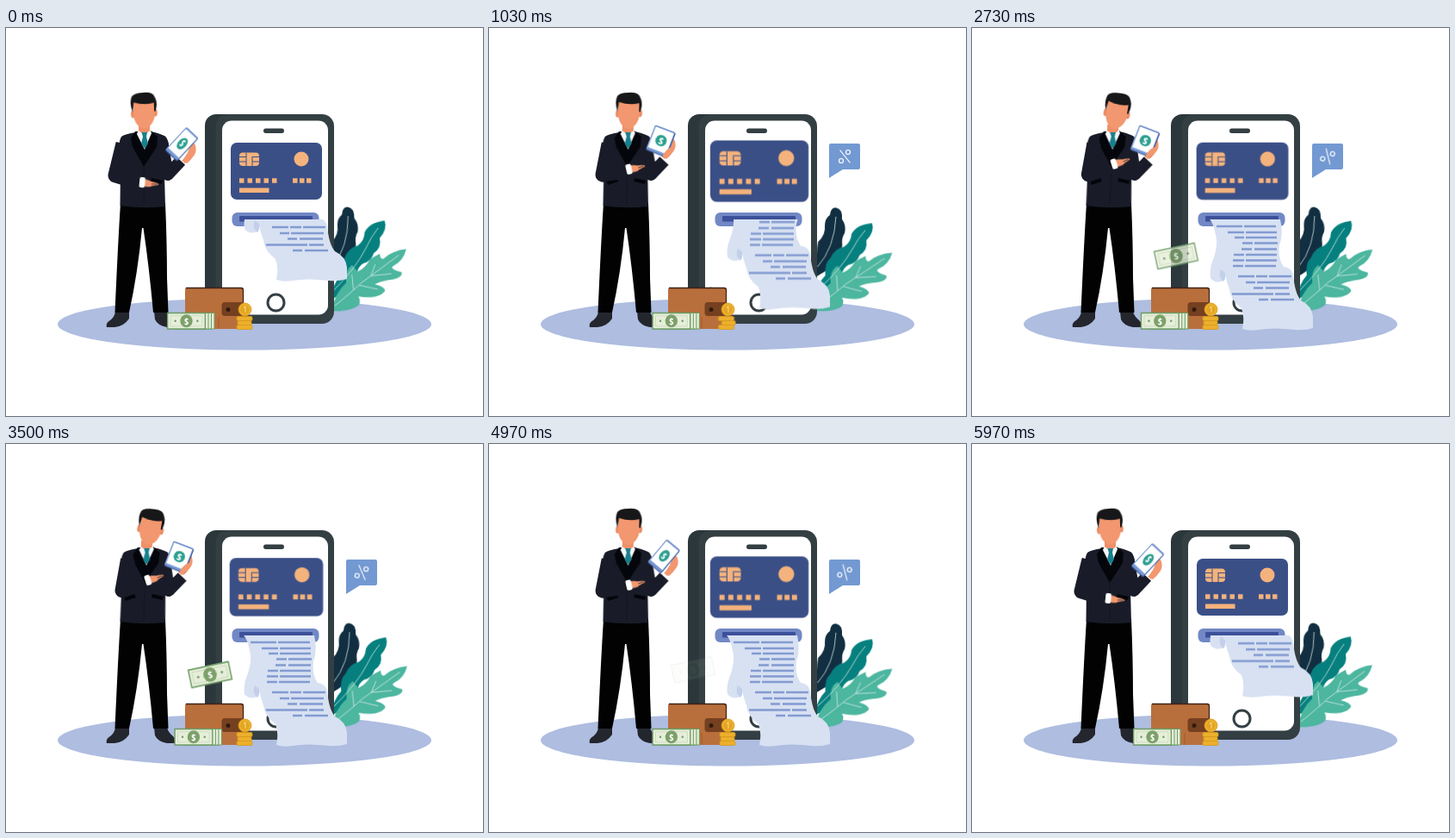
Write an HTML page that moves like this. It is 554 px wide and 450 px high and loops after 6010 ms.

```html
<!DOCTYPE html>
<html lang="en">
<head>
<meta charset="utf-8">
<title>Mobile payment</title>
<style>
:root { --loop: 6.01s; --sine: cubic-bezier(.37, 0, .63, 1); }
html, body { margin: 0; width: 100%; height: 100%; overflow: hidden; background: #fff; }
svg { display: block; }
text { font: 700 10px "Open Sans", Arial, sans-serif; text-anchor: middle; fill: #fff; }

/* fast: two swings per loop, slow: one */
.fast { animation: calc(var(--loop) / 4) var(--sine) infinite alternate; }
.slow { animation: calc(var(--loop) / 2) var(--sine) infinite alternate; }
.once { animation: var(--loop) var(--sine) infinite; }

#leaves { animation-name: sway; transform-origin: 385px 325px; }
@keyframes sway { from { transform: rotate(-3.6deg); } to { transform: rotate(.3deg); } }

#card { animation-name: grow; transform-origin: 314px 166px; }
@keyframes grow { to { transform: scale(1.1); } }

#stack { animation-name: slide; }
@keyframes slide { to { transform: translateX(9px); } }

#torso { animation-name: lean; transform-origin: 160px 206px; }
@keyframes lean { to { transform: skewX(-2deg); } }

#head { animation-name: nod; transform-origin: 161px 122px; }
@keyframes nod {
  from { transform: rotate(-2deg); }
  to { transform: translateX(3px) rotate(10deg); }
}

#receipt { animation-name: print; }
@keyframes print {
  0%, 100% { transform: translateY(-57px); }
  31.5%, 83.3% { transform: none; }
}

#tablet { animation-name: tilt; }
@keyframes tilt {
  0%, 100% { transform: translate(204px, 135px) rotate(43deg) scale(.75, 1.18); }
  17%, 28% { transform: translate(199.5px, 131.5px) rotate(21deg); }
  45%, 71% { transform: translate(201px, 131.5px) rotate(21deg); }
  83% { transform: translate(203px, 130.5px) rotate(40deg) scale(.8, 1.13); }
}

.grip { animation-name: grip; }
@keyframes grip {
  0%, 100% { transform: translate(4px, 5px); }
  17%, 72% { transform: none; }
  83% { transform: translate(3px, 1px); }
}

#sleeve { animation-name: bend; }
@keyframes bend {
  0%, 100% { d: path("M136 134 L127 171 L153 179"); }
  25%, 75% { d: path("M140 134 L133.5 170 L159 162"); }
  50% { d: path("M142 134 L135.500 170 L160 160"); }
}

#palm { animation-name: reach; }
@keyframes reach {
  0%, 100% { transform: translate(158px, 179px) rotate(6deg); }
  25%, 75% { transform: translate(163.5px, 159.5px) rotate(-18deg); }
  50% { transform: translate(165px, 157.500px) rotate(-18deg); }
}

#bubble { animation-name: pop; transform-origin: 395px 174px; }
@keyframes pop {
  0%, 2%, 98%, 100% { transform: scale(0); }
  14%, 86% { transform: none; }
}

#percent { animation-name: twist; transform-origin: 413.5px 149px; }
@keyframes twist {
  0%, 17%, 100% { transform: none; }
  28% { transform: rotate(4deg); }
  45% { transform: rotate(25deg); }
  70% { transform: rotate(8deg); }
  83% { transform: rotate(24deg); }
}

#cash { animation: window var(--loop) step-end infinite; }
@keyframes window {
  0%, 83.33% { visibility: hidden; }
  16.67% { visibility: visible; }
}
#note { animation: rise calc(var(--loop) / 6) linear infinite; }
@keyframes rise {
  0% { transform: translateY(55px); animation-timing-function: cubic-bezier(.3, .35, .6, 1); }
  62% { transform: none; opacity: 1; }
  72% { transform: none; opacity: .85; }
  97% { opacity: .06; }
  100% { transform: translateY(-3px); opacity: 0; }
}

.coin { animation-name: jiggle; }
.coin.odd { animation-name: jiggle-odd; }
@keyframes jiggle {
  0%, 10%, 38%, 100% { transform: none; }
  17%, 28% { transform: translateX(-1.5px); }
}
@keyframes jiggle-odd {
  0%, 10%, 38%, 100% { transform: none; }
  17%, 28% { transform: translateX(1.2px); }
}
</style>
</head>
<body>
<svg width="554" height="450" xmlns="http://www.w3.org/2000/svg">
  <defs>
    <clipPath id="below"><path d="M250 222.500H420V370H250Z"/></clipPath>
    <g id="bill">
      <rect x="-24.500" y="-10" width="49" height="20" fill="#6c9b65"/>
      <rect x="-23" y="-8.500" width="46" height="17" fill="#e6eed9"/>
      <path d="M-20-6H20V6H-20Z" fill="none" stroke="#c4d8b8" stroke-width=".8"/>
      <ellipse rx="7.800" ry="7.500" fill="#7ca169"/>
      <circle cx="-14" r="1.300" fill="#6c9b65"/><circle cx="14" r="1.300" fill="#6c9b65"/>
      <text y="3.700">$</text>
    </g>
  </defs>

  <ellipse cx="277" cy="343.500" rx="217" ry="30" fill="#aebde0"/>

  <g id="leaves" class="fast">
    <path fill="#112f41" d="M378 290Q381 260 383 248Q392 240 391 229Q391 221 397 217Q398 208 404 208.500Q412 210 411 222Q416 229 414 238Q410 244 411 252Q410 262 404 267Q399 279 381 288Z"/>
    <path fill="#06807f" d="M378 312Q382 296 391 287Q390 273 397 267Q402 256 413 254Q421 249 422 239Q428 228 446 227Q449 237 439 247Q441 258 431 264Q428 273 418 275Q411 279 410 287Q405 295 397 297Q393 308 380 314Z"/>
    <path fill="#4cb69f" d="M378 328Q383 307 397 296Q396 282 405 276Q408 280 411 284Q420 281 426 271Q431 268 438 265Q438 272 442 271Q453 262 469 261.500Q465 275 453 280Q447 283 462 288Q463 295 447 296Q436 297 430 300Q443 304 441 309Q432 318 410 313Q413 318 410 323Q401 330 379 328Z"/>
    <g fill="none" stroke="#d4e8e5" stroke-width=".8">
      <path d="M382 277Q402 255 404 219M382 304Q410 279 422 258Q429 245 438 235"/>
      <path d="M382 322Q402 308 415 297Q437 283 460 268M405 305L404 287M412 300L433 306M426 290L432 277M426 290L450 289"/>
    </g>
  </g>

  <rect x="231" y="100" width="145" height="243" rx="13" fill="#2b373b"/>
  <rect x="243.500" y="100" width="137.500" height="243" rx="14" fill="#333f43"/>
  <rect x="251" y="107.500" width="123" height="225" rx="11" fill="#fff"/>
  <rect x="299" y="116.500" width="24" height="5.500" rx="2.700" fill="#333f43"/>
  <circle cx="313.500" cy="318.500" r="9.500" fill="#fff" stroke="#333f43" stroke-width="3"/>

  <g id="card" class="fast" fill="#f4b27c">
    <rect x="261" y="133" width="106" height="66" rx="7" fill="#3b4f87"/>
    <rect x="271" y="144.500" width="23" height="15.500" rx="4"/>
    <path d="M271 149.500H279V144.500M271 155H279V160M294 149.500H286V160M294 155H286M279 149.500V155" fill="none" stroke="#3b4f87"/>
    <circle cx="343" cy="152" r="8.500"/>
    <path d="M271 177H276.500M280.500 177H286M290 177H295.500M299.500 177H305M309 177H314.500M333 177H338.500M341 177H346.500M349 177H354.500" stroke="#f4b27c" stroke-width="5.500"/>
    <rect x="271" y="185.500" width="34.500" height="5.500"/>
  </g>

  <rect x="262.500" y="214" width="101" height="16" rx="6" fill="#7188c5"/>
  <rect x="271" y="218" width="85" height="6.500" rx="1" fill="#3c509a"/>
  <g clip-path="url(#below)">
    <g id="receipt" class="once">
      <path fill="#d8e1f2" d="M276 215H358V222Q362 240 357 252Q355 267 362 277Q371 278 373 286Q375 308 382 316Q395 322 396 335V348Q386 351 375 350Q350 347 333 350Q322 352 314 349Q317 335 313 325Q300 315 299 303Q296 295 294 286L293 293Q282 297 277 290Q275 280 281 266Q286 250 283 240Q280 225 276 222Z"/>
      <path fill="#c3d0ea" d="M289 280Q285 289 292 294Q295 291 294 284Z"/>
      <path fill="none" stroke="#829bd1" stroke-width="2.600" d="M284 230H314M316 230H353M297 237H316M318 237H354M305 243H316M318 243H354M314 249.500H326M328 249.500H355M313 256.500H325M328 256.500H354M304 263H316M318 263H354M303 269.500H316M318 269.500H354M303 276H315M317 276H353M309 288H328M330 288H343M345 288H371M318 295H329M331 295H369M327 301.500H338M341 301.500H368M302 308.500H350M352 308.500H369M333 315H344M347 315H374"/>
    </g>
  </g>

  <g id="bubble" class="once">
    <path fill="#7399d2" d="M397 134H429Q431 134 431 136V162Q431 164 429 164H411L395 174V136Q395 134 397 134Z"/>
    <g id="percent" class="once" fill="none" stroke="#fff" stroke-width="1.200">
      <path d="M407.500 141.500L419.500 156.500"/><circle cx="417" cy="144" r="2.500"/><circle cx="409" cy="154" r="2.500"/>
    </g>
  </g>

  <g id="cash"><g id="note"><use href="#bill" transform="translate(237 264.500) rotate(-12) scale(1 1.120)"/></g></g>

  <path fill="#b96f3b" d="M208 303Q208 301 210 301H273Q276 301 276 304V349H208Z"/>
  <path d="M209 301.500H273Q275.500 301.500 275.500 304V319" fill="none" stroke="#3f2115" stroke-width="1.300"/>
  <path d="M247 349V335" stroke="#a35d2e"/>
  <path fill="#754020" d="M276 318H254Q250.500 318 250.500 322V330Q250.500 334 254 334H276Z"/>
  <circle cx="258" cy="326.500" r="2.500" fill="#2f1a10"/>

  <g stroke="#d9981d" stroke-width=".8" fill="#ecb02c">
    <rect class="coin once" x="268" y="344.500" width="18" height="5" rx="1.500"/>
    <rect class="coin odd once" x="269" y="339.500" width="16" height="5" rx="1.500"/>
    <rect class="coin once" x="268" y="334.500" width="18" height="5" rx="1.500"/>
    <circle cx="277.500" cy="326.500" r="7.500"/>
    <circle cx="277.500" cy="326.500" r="5" fill="#e3a424" stroke="none"/>
    <path d="M276 324.500L278 323V330" fill="none" stroke="#f9d46d" stroke-width="1.200"/>
  </g>

  <!-- legs -->
  <path fill="#24262e" d="M127 329H143V337Q137 346 126 347H117Q115.500 342 121 339Q126 335 127 329ZM172 329H187Q189 335 193 338Q198 342 196 347H187Q176 345 173 338Z"/>
  <path fill="#020203" d="M133 203H185Q187 250 187 290L188.500 330H171Q166 275 159.500 232H158Q153 285 143 330H126.500Q130 250 133 203Z"/>

  <g id="stack" class="slow">
    <g fill="#e6eed9" stroke="#6c9b65">
      <rect x="197" y="330.500" width="45" height="18.500"/><rect x="197" y="330.500" width="41.500" height="18.500"/><rect x="197" y="330.500" width="38" height="18.500"/>
    </g>
    <use href="#bill" transform="translate(209.500 339.800) scale(.92 1)"/>
  </g>

  <g id="torso" class="slow">
    <path d="M181 132L188 170L203 154" fill="none" stroke="#191c28" stroke-width="14" stroke-linejoin="round"/>
    <path fill="#191c28" d="M151 121Q138 123 134 126Q129 134 133 160L132.500 206Q158 210 185 207L184 170L190 150Q190 128 184 125Q175 121 168 120Z"/>
    <path fill="#05060b" d="M150 120L145 128L147 138L160 161L175 138L176 126L168 119Z"/>
    <path fill="#f5f7fb" d="M154 118L167 117L169 122L161 141L152 123Z"/>
    <path fill="#ef8f69" d="M154 112H167V119Q161 126 154 119Z"/>
    <path fill="#17808c" d="M157.500 121H164L163 126L165 134L161 140L157 134L159 126Z"/>
    <path d="M160 161V205" stroke="#11141f"/>
    <path fill="#04050a" d="M136 178L148 174L150 178L138 182ZM169 174L182 177L181 181L168 178Z"/>
  </g>

  <g id="head" class="slow">
    <ellipse cx="148.500" cy="99.500" rx="2.700" ry="4.500" fill="#ea8c67"/>
    <ellipse cx="174" cy="98.500" rx="2.700" ry="4.500" fill="#ea8c67"/>
    <path fill="#f2976f" d="M149 84H173.500V102Q172 110 167 114Q161 119 155 114Q150 110 149 102Z"/>
    <path fill="#17171a" d="M148 97Q144 86 147.500 79Q151 75 160 75Q172 74 174 80Q178 87 174.500 97H173V87Q161 90 149.500 86Z"/>
  </g>

  <g class="once grip">
    <path fill="#f2976f" d="M203 146Q208 139 210 131Q213 126 215.500 130Q218 137 215 142Q211 148 206 152L200 149Z"/>
  </g>
  <g id="tablet" class="once">
    <rect x="-13" y="-15.500" width="26" height="31" rx="2" fill="#3f5797"/>
    <rect x="-13" y="-15.500" width="25" height="30" rx="2" fill="#7596d2"/>
    <rect x="-11.500" y="-14" width="22.500" height="25.500" fill="#fff"/>
    <circle cy="-1" r="6.600" fill="#2d9f90"/>
    <text y="2.500">$</text>
  </g>
  <g class="once grip">
    <path fill="#f2976f" d="M202 147Q206 141 210 139L214 137.500Q214 143 207 150L203 152Z"/>
  </g>

  <path id="sleeve" class="once" d="M136 134L127 171L153 179" fill="none" stroke="#191c28" stroke-width="17" stroke-linejoin="round"/>
  <g id="palm" class="once">
    <path fill="#f2976f" d="M1-4Q7-4 11-2L18-1Q21 1 17 1.500L12 3Q9 5.500 2 4Z"/>
    <path d="M11 1L18 0" stroke="#262029" stroke-width=".8"/>
    <rect x="-3" y="-6" width="6.500" height="12" rx="2" fill="#fff"/>
  </g>
</svg>
</body>
</html>
```
